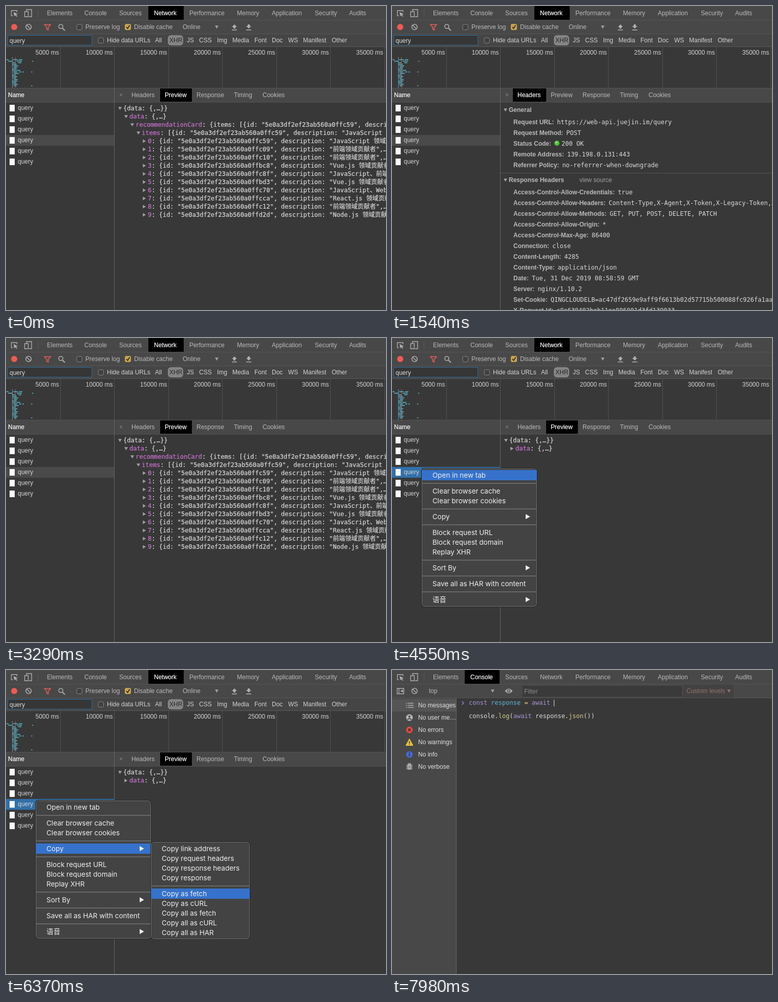
These frames come from a looping animation (742 by 594 pixels, 8 s). An HTML page:

```html
<!DOCTYPE html>
<html lang="en">
<head>
<meta charset="utf-8">
<title>Network panel</title>
<style>
html, body { margin: 0; width: 100%; height: 100%; overflow: hidden; background: #383838; }
svg { display: block; width: 742px; height: 594px; }
text { font: 12px "Liberation Sans", Arial, sans-serif; fill: #bababa; white-space: pre; }
.on { fill: #fff; stroke: #fff; stroke-width: .2px; }
.b { font-weight: bold; }
.mono { font-family: "DejaVu Sans Mono", "Noto Sans CJK SC", "Noto Sans CJK", monospace; fill: #dadada; }
.tree { stroke: #dadada; stroke-width: .2px; }
.key { fill: #cb72d2; stroke: #cb72d2; }
.menu text { font: 13.5px Inter, "Noto Sans CJK SC", "Noto Sans CJK", sans-serif; fill: #f0f0f0; }
.kw { fill: #a893d6; } .var { fill: #62b3da; } .fn { fill: #d5cb8b; }

[class^="t-"] { animation: 8s step-end infinite; }
.t-network { animation-name: network; }
.t-console { animation-name: console; }
.t-expanded { animation-name: expanded; }
.t-collapsed { animation-name: collapsed; }
.t-preview { animation-name: preview; }
.t-headers { animation-name: headers; }
.t-hover { animation-name: hover; }
.t-menu { animation-name: menu; }
.t-pick { animation-name: pick; }
.t-submenu { animation-name: submenu; }
.t-subpick { animation-name: subpick; }
@keyframes network { 0% { opacity: 1 } 89%, to { opacity: 0 } }
@keyframes console { 0% { opacity: 0 } 89%, to { opacity: 1 } }
@keyframes expanded { 0% { opacity: 1 } 18.75% { opacity: 0 } 34.4% { opacity: 1 } 46%, to { opacity: 0 } }
@keyframes collapsed { 0% { opacity: 0 } 46%, to { opacity: 1 } }
@keyframes preview { 0% { opacity: 1 } 18.75% { opacity: 0 } 34.4%, to { opacity: 1 } }
@keyframes headers { 0% { opacity: 0 } 18.75% { opacity: 1 } 34.4%, to { opacity: 0 } }
@keyframes hover { 0% { opacity: 0 } 30.5% { opacity: 1 } 34.4%, to { opacity: 0 } }
@keyframes menu { 0% { opacity: 0 } 51.5% { opacity: 1 } 83%, to { opacity: 0 } }
@keyframes pick {
  0% { opacity: 0; transform: none }
  54% { opacity: 1; transform: none }
  61% { opacity: 1; transform: translateY(31px) }
  62% { opacity: 1; transform: translateY(50px) }
  63%, to { opacity: 1; transform: translateY(81px) }
}
@keyframes submenu { 0% { opacity: 0 } 65.5%, to { opacity: 1 } }
@keyframes subpick {
  0% { opacity: 0; transform: none }
  68% { opacity: 1; transform: none }
  69% { opacity: 1; transform: translateY(19px) }
  70% { opacity: 1; transform: translateY(38px) }
  71% { opacity: 1; transform: translateY(57px) }
  73%, to { opacity: 1; transform: translateY(88px) }
}
</style>
</head>
<body>
<svg id="stage" viewBox="0 0 742 594" xmlns="http://www.w3.org/2000/svg"></svg>
<script>
const text = (x, y, s, cls = '', extra = '') => `<text x="${x}" y="${y}" class="${cls}" ${extra}>${s}</text>`;
const rect = (x, y, w, h, fill, extra = '') => `<rect x="${x}" y="${y}" width="${w}" height="${h}" fill="${fill}" ${extra}/>`;
const path = (d, stroke = '#b0b0b0', width = 1.4, fill = 'none') =>
  `<path d="${d}" stroke="${stroke}" stroke-width="${width}" fill="${fill}"/>`;
const disc = (x, y, r, fill, extra = '') => `<circle cx="${x}" cy="${y}" r="${r}" fill="${fill}" ${extra}/>`;
const group = (cls, ...parts) => `<g class="${cls}">${parts.flat().join('')}</g>`;
const down = (x, y, r = 4, fill = '#a0a0a0') => path(`M${x - r} ${y - r * .8}h${2 * r}l${-r} ${r * 1.7}z`, 'none', 0, fill);
const right = (x, y, r = 4, fill = '#a0a0a0') => path(`M${x - r * .8} ${y - r}v${2 * r}l${r * 1.7} ${-r}z`, 'none', 0, fill);
const key = s => `<tspan class="key">${s}</tspan>`;

const bar = '#484848', panel = '#383838', edge = '#5a5a5a';
const tabs = [['Elements', 80], ['Console', 153], ['Sources', 221], ['Network', 289], ['Performance', 358],
  ['Memory', 451], ['Application', 519], ['Security', 603], ['Audits', 670]];

const block = disc(44, 41, 5.3, 'none', 'stroke="#b0b0b0" stroke-width="1.6"') + path('M40.5 37.5l7 7', '#b0b0b0', 1.6);

function topBar(active, x, w) {
  return [
    rect(0, 0, 742, 55, bar),
    path('M0 27.5H742M0 54.5H742', '#555', 1),
    path('M62.5 6V22', '#5c5c5c', 1),
    path('M13 19h-2.500v-10h11v3', '#b0b0b0', 1.3),
    path('M15 12l8 4-3.500 1 2.500 3-1.500 1-2.500-3-2 2z', 'none', 0, '#b0b0b0'),
    path('M40 10V7h10v14h-5M36.500 11h7v10h-7z', '#b0b0b0', 1.4),
    rect(x, 0, w, 27, '#000'),
    tabs.map(([name, left]) => text(left, 18, name, name === active ? 'on' : ''))
  ].flat().join('');
}

function toolbar() {
  const box = (x, y) => rect(x - 5, y - 5, 10.5, 10.5, '#404040', 'rx="2.5" stroke="#858585"');
  const filters = [['All', 291], ['JS', 353], ['CSS', 377], ['Img', 412], ['Media', 442], ['Font', 485],
    ['Doc', 519], ['WS', 551], ['Manifest', 580], ['Other', 636]];
  return [
    disc(16, 41, 6, '#ee5b54'), block,
    path('M75 36.500h12l-4.500 5v5.500l-3-1.500v-4z', '#e8605a', 1.5),
    disc(107, 40, 4, 'none', 'stroke="#b0b0b0" stroke-width="1.6"'), path('M110 43l5 5', '#b0b0b0', 2),
    box(143, 41), text(155, 45, 'Preserve log'),
    rect(232, 35, 12, 12, '#c9a24d', 'rx="3"'), path('M235 41l2.500 3 4-6.500', '#222', 1.6),
    text(250, 45, 'Disable cache'), text(345, 45, 'Online'), down(411.5, 41, 3.5),
    path('M446 36l5 5h-3v3h-4v-3h-3zM441 46h10v1.500h-10z', 'none', 0, '#b0b0b0'),
    path('M474 44l5-5h-3v-3h-4v3h-3zM469 46h10v1.500h-10z', 'none', 0, '#b0b0b0'),
    rect(0, 55, 742, 25, '#454545'),
    rect(3.5, 57.5, 164, 19, '#363636', 'stroke="#2f6c9d"'), text(7, 72, 'query', '', 'style="fill:#ddd"'),
    box(185, 67), text(197, 71, 'Hide data URLs', '', 'style="fill:#d2d2d2"'),
    rect(316, 57, 30, 20, '#858585', 'rx="6"'), text(319, 71, 'XHR', '', 'style="fill:#262626"'),
    filters.map(([s, x]) => text(x, 71, s, '', 'style="fill:#d2d2d2"'))
  ].flat().join('');
}

function overview() {
  const out = [rect(0, 80, 742, 80, panel), path('M0 79.500H742', edge, 1)];
  for (let i = 1; i <= 7; i++) {
    const x = Math.round(i * 105.55);
    out.push(path(`M${x + .5} 80V160`, '#525252', 1),
      text(x - 2.5, 95, `${i * 5000} ms`, '', 'text-anchor="end" style="fill:#d2d2d2"'));
  }
  out.push(path('M12.500 100V160', '#4ba3c4', 1), path('M18.500 100V160', '#b8574f', 1));
  const dash = (x, y, w) => rect(x, y, w, 1.7, '#57a8b8');
  for (let i = 0; i < 16; i++) out.push(dash(12 + i * 5 % 4, 110 + i * 3, 6 + i * 7 % 5));
  out.push(dash(1, 104, 4), dash(4, 107, 8), dash(14, 104, 9), dash(25, 104, 7), dash(21, 107, 10), dash(24, 110, 6),
    dash(20, 125, 8), dash(26, 128, 4), dash(32, 128, 3), dash(51, 107, 2.5), dash(49, 128, 2.5), dash(49, 155, 2.5));
  return out.join('');
}

function requestList() {
  const out = [rect(0, 160, 742, 28, bar), path('M0 160.500H742M0 188H742', '#555', 1), text(4, 178, 'Name', 'on'),
    rect(0, 252, 211, 21, '#4a4a4a'),
    `<g class="t-menu">${rect(0, 252, 211, 21, '#3270a8')}</g>`];
  for (let i = 0; i < 6; i++) {
    const y = 193 + i * 21;
    out.push(rect(7, y, 10, 13, '#fafafa'), text(23, y + 10, 'query', '', 'style="fill:#d2d2d2"'));
  }
  out.push(path('M211.500 160V594', '#666', 1), text(221, 178, '×', '', 'style="fill:#858585"'));
  [['Headers', 245], ['Preview', 310], ['Response', 372], ['Timing', 445], ['Cookies', 501]]
    .forEach(([s, x]) => out.push(text(x, 178, s)));
  return out.join('');
}

const headersTab = rect(236, 161, 65, 26, '#000') + text(245, 178, 'Headers', 'on');
const previewTab = fill => rect(301, 161, 62, 26, fill) + text(310, 178, 'Preview', 'on');
const root = down(222.5, 200, 3.5) + text(229, 204, '{data: {,…}}', 'mono tree');
const data = text(241, 220, key('data') + ': {,…}', 'mono tree');

function tree() {
  const items = [['fc59', 'JavaScript 领域贡献者'], ['fc09', '前端领域贡献者'], ['fc10', '前端领域贡献者'],
    ['fbc8', 'Vue.js 领域贡献者'], ['fc8f', 'JavaScript、前端领域贡献者'], ['fbd3', 'Vue.js 领域贡献者'],
    ['fc70', 'JavaScript、Web 领域贡献者'], ['fcca', 'React.js 领域贡献者'], ['fc12', '前端领域贡献者'], ['fd2d', 'Node.js 领域贡献者']];
  const entry = ([id, about]) => `{id: "5e0a3df2ef23ab560a0f${id}", description: "${about}",…`;
  return [root, down(234.5, 216, 3.5), data,
    down(246.5, 232, 3.5), text(253, 236, `${key('recommendationCard')}: {items: [${entry(items[0])}`, 'mono tree'),
    down(258.5, 248, 3.5), text(265, 252, `${key('items')}: [${entry(items[0])}`, 'mono tree'),
    items.map((item, i) => right(270, 264 + i * 16, 3.5) + text(277, 268 + i * 16, `${key(i)}: ${entry(item)}`, 'mono tree'))
  ].flat();
}

function headerList() {
  const field = ([name, value, dx = 6], x, y) =>
    text(x, y, `${name}:<tspan class="mono" style="font-weight:normal" dx="${dx}">${value}</tspan>`, 'b');
  const general = [['Request URL', 'https://web-api.juejin.im/query'], ['Request Method', 'POST'], ['Status Code', '200 OK', 20],
    ['Remote Address', '139.198.0.131:443'], ['Referrer Policy', 'no-referrer-when-downgrade']];
  const allow = 'Access-Control-Allow-';
  const response = [[allow + 'Credentials', 'true'],
    [allow + 'Headers', 'Content-Type,X-Agent,X-Token,X-Legacy-Token,X-'],
    [allow + 'Methods', 'GET, PUT, POST, DELETE, PATCH'], [allow + 'Origin', '*'],
    ['Access-Control-Max-Age', '86400'], ['Connection', 'close'], ['Content-Length', '4285'],
    ['Content-Type', 'application/json'], ['Date', 'Tue, 31 Dec 2019 08:58:59 GMT'], ['Server', 'nginx/1.10.2'],
    ['Set-Cookie', 'QINGCLOUDELB=ac47df2659e9aff9f6613b02d57715b500088fc926fa1aa'],
    ['X-Request-Id', 'c8a638402bab11ea886801d3fd139033']];
  return [down(221.5, 203, 3.5), text(228, 207, 'General', 'b'),
    general.map((f, i) => field(f, 237, 231 + i * 21)),
    disc(322, 268, 5, '#4fc33c'), disc(321, 266.5, 2, '#8fe07c'),
    path('M212 326.500H742', '#555', 1),
    down(221.5, 340, 3.5), text(228, 344, 'Response Headers', 'b'), text(366, 344, 'view source', '', 'style="fill:#a2a2a2"'),
    response.map((f, i) => field(f, 237, 368 + i * 21))].flat();
}

function menuBox(x, y, w, h, pick, rows, rules, arrows = []) {
  const clip = 'rx="5" stroke="#222" stroke-width="2"';
  return [rect(x, y, w, h, '#434343', clip), rect(x + .5, y + .5, w - 1, h - 1, 'none', 'rx="5" stroke="#747474"'),
    group(pick, rect(x, y + 3, w, 20, '#3672cb')),
    rules.map(r => rect(x + 1, r - 1, w - 2, 2, '#676767')),
    rows.map(([s, c]) => text(x + 21, c + 5, s)),
    arrows.map(c => right(265, c, 5, '#f0f0f0'))].flat().join('');
}

function menus() {
  const main = [['Open in new tab', 268], ['Clear browser cache', 299], ['Clear browser cookies', 318], ['Copy', 349],
    ['Block request URL', 380], ['Block request domain', 399], ['Replay XHR', 418], ['Sort By', 449],
    ['Save all as HAR with content', 480], ['语音', 511]];
  const sub = [['Copy link address', 349], ['Copy request headers', 368], ['Copy response headers', 387], ['Copy response', 406],
    ['Copy as fetch', 437], ['Copy as cURL', 456], ['Copy all as fetch', 475], ['Copy all as cURL', 494], ['Copy all as HAR', 513]];
  return group('t-menu menu',
    menuBox(58, 255, 225, 270, 't-pick', main, [284, 334, 365, 434, 465, 496], [349, 449, 511]),
    group('t-submenu', menuBox(283, 336, 193, 190, 't-subpick', sub, [422])));
}

function consolePanel() {
  const span = (cls, s) => `<tspan class="${cls}">${s}</tspan>`;
  const labels = ['No messages', 'No user me…', 'No errors', 'No warnings', 'No info', 'No verbose'];
  return [rect(0, 0, 742, 594, panel), topBar('Console', 142, 68),
    path('M10 36h13v10.500h-13zM13.500 36v10.500', '#b0b0b0', 1.3), right(19, 41, -3, '#b0b0b0'), block,
    text(72, 45, 'top'), down(196.5, 41, 3.5),
    path('M220.500 41q7.500-9 15 0q-7.500 9-15 0z', 'none', 0, '#b0b0b0'), disc(228, 41, 3.3, bar), disc(228, 41, 1.8, '#b0b0b0'),
    rect(255, 31, 311, 21, '#3a3a3a'), text(258, 46, 'Filter', '', 'style="fill:#8c8c8c"'),
    rect(568, 28, 99, 26, '#434141'), text(575, 45, 'Custom levels', '', 'style="fill:#94736f"'), down(658, 41, 3.5, '#94736f'),
    rect(0, 55, 125, 539, '#484848'), rect(0, 57, 125, 24, '#555'), path('M125.500 55V594', '#6a6a6a', 1),
    labels.map((s, i) => text(51, 73 + i * 24, s, '', 'style="fill:#e0e0e0"')),
    path('M31 65h11M31 69h11M31 73h11M27.500 65h2M27.500 69h2M27.500 73h2', '#b0b0b0', 1.5),
    disc(34, 93, 6.5, '#b8b8b8'), disc(34, 91, 2.1, '#484848'), path('M30 97q4-4 8 0', '#484848', 2),
    disc(34, 117, 6.5, '#df4b45'), path('M31.500 114.500l5 5m0-5l-5 5', '#3b2222', 1.4),
    path('M34 134.500l7 13h-14z', '#edc23c', 1, '#edc23c'), path('M34 139v4.500m0 1v1.500', '#333', 1.6),
    disc(34, 165, 6.5, '#4869c9'), path('M34 163.500v5m0-7v-1.500', '#1d2c5c', 1.6),
    path('M28 186h12M28 189.500h12M28 193h12M31 182l6 3m0-3l-6 3', '#b8b8b8', 1.3),
    `<ellipse cx="34" cy="189.500" rx="3.600" ry="5.500" fill="#b8b8b8"/>`, path('M32 188h4m-4 3h4', '#484848', 1),
    path('M136.500 61l3.500 3.500-3.500 3.500', '#9386bb', 1.5),
    text(150, 68, `${span('kw', 'const')} ${span('var', 'response')} ${span('fn', '=')} ${span('kw', 'await')}`, 'mono'),
    rect(316, 58, 1, 13, '#ddd'),
    text(150, 94, `console.${span('fn', 'log')}(${span('kw', 'await')} response.${span('fn', 'json')}())`, 'mono')].flat();
}

document.getElementById('stage').innerHTML =
  group('t-network', rect(0, 0, 742, 594, panel), topBar('Network', 278, 69), toolbar(), overview(), requestList(),
    group('t-preview', previewTab('#000')),
    group('t-hover', previewTab('#404040')),
    group('t-headers', headersTab, headerList()),
    group('t-expanded', tree()),
    group('t-collapsed', root, right(234, 216, 3.5), data),
    menus()) +
  group('t-console', consolePanel());
</script>
</body>
</html>
```
